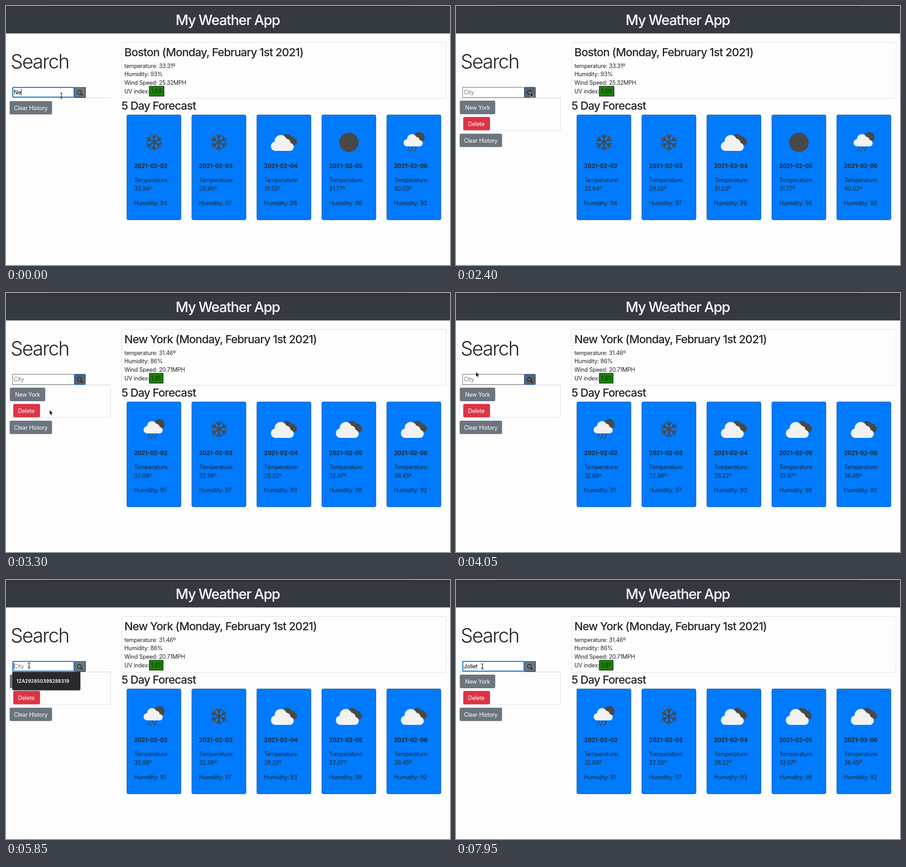
Write an HTML page that moves like this. It is 979 px wide and 572 px high and loops after 8 s.

```html
<!DOCTYPE html>
<html lang="en">
<head>
<meta charset="utf-8">
<title>My Weather App</title>
<style>
  html, body { margin: 0; width: 100%; height: 100%; overflow: hidden; background: #fdfdfd; }
  svg { display: block; width: 979px; height: 572px; }
  text {
    font: 400 12.45px Inter, "Liberation Sans", Arial, sans-serif;
    font-optical-sizing: none;
    letter-spacing: -.016em;
    fill: #212529;
    white-space: pre;
  }
  .brand { font-size: 31px; font-weight: 500; letter-spacing: -.043em; fill: #fff; }
  .head { font-size: 24.9px; font-weight: 500; letter-spacing: -.038em; }
  .search { font-size: 43px; font-weight: 300; letter-spacing: -.046em; }
  .date { font-weight: 700; letter-spacing: 0; }
  .btn { fill: #fff; }
  .hint { fill: #fff; font-size: 10.3px; font-weight: 600; letter-spacing: .01em; }
  .box { fill: none; stroke: #dfdfdf; }
  .grey { fill: #6c757d; }
  .dark { fill: #484848; }
  .pale { fill: #f2f2f0; }
  .flake, .drops { fill: none; stroke: #484848; stroke-width: 3; stroke-linecap: round; }
  .drops { stroke-width: 2.6; }
</style>
</head>
<body>
<svg viewBox="0 0 979 572">
  <defs>
    <path id="arm" d="M0 0V-17.2M-5.2-14.8L0-9.6L5.2-14.8"/>
    <g id="snow" class="flake"></g>
    <circle id="moon" class="dark" r="21.5"/>
    <g id="clouds">
      <path class="dark" d="M-3-9A10.2 10.2 0 0 1 16.5-12.5A8 8 0 0 1 25-7.5A7.5 7.5 0 0 1 24 6H0Z"/>
      <path class="pale" d="M-19.5 19A10.3 10.3 0 0 1-20.5-1.4A13.6 13.6 0 0 1 5.5-8A9.8 9.8 0 0 1 14.5 1.3A9 9 0 0 1 14 19Z"/>
    </g>
    <g id="rain">
      <circle class="dark" cx="11.8" cy="-11" r="11.7"/>
      <path class="pale" d="M-14.5 9A8 8 0 0 1-15.3-7A10.8 10.8 0 0 1 5.2-12A7.5 7.5 0 0 1 12.5-5A7 7 0 0 1 12 9Z"/>
      <path class="drops" d="M-10.5 12l-.8 1.2M-12.6 17l-.4.8M-2.8 12l-1.6 2.6M-6.2 18l-1.2 1.8M4.8 12l-.8 1.2M2.6 16l-1.6 2.8"/>
    </g>
  </defs>

  <rect width="979" height="572" fill="#fdfdfd"/>
  <rect width="979" height="60.6" fill="#343a40"/>
  <rect width="979" height="4" fill="#37383b"/>
  <rect y="4" width="979" height="1" fill="#2b2e32"/>
  <rect x="88" width="803" height="1" fill="#17181a"/>
  <text class="brand" x="374" y="42">My Weather App</text>
  <text class="search" x="10.3" y="137.6">Search</text>

  <rect class="box" x="255" y="80.5" width="715.5" height="123.5" rx="3"/>
  <g id="now"></g>
  <text x="261" y="192.7">UV index:</text>
  <rect id="uvBox" x="316" y="177.2" height="22" fill="#1a8005" stroke="#0b0b0b"/>
  <text id="uv" x="320" y="192.7"></text>
  <text class="head" x="254.5" y="229">5 Day Forecast</text>
  <g id="days"></g>

  <rect x="8" y="202.5" width="223" height="1" fill="#d4d4d4"/>
  <g id="list">
    <rect class="box" x="8.5" y="203" width="222" height="72" rx="3"/>
    <rect class="grey" x="8.5" y="209" width="78" height="30" rx="3"/>
    <text class="btn" x="20" y="228.8">New York</text>
    <rect x="16" y="245" width="59" height="29.5" rx="3" fill="#dc3545"/>
    <text class="btn" x="26.5" y="264.7">Delete</text>
  </g>
  <g id="clear">
    <rect class="grey" x="8" y="210" width="93.5" height="29.5" rx="3"/>
    <text class="btn" x="17.5" y="229.5">Clear History</text>
  </g>

  <rect id="field" fill="#fff"/>
  <text id="typed" x="17" y="195"></text>
  <rect id="caret" y="183" width="1" height="15" fill="#111"/>
  <g id="goPlain">
    <rect x="151" y="179" width="24.5" height="23.5" fill="#6c757d"/>
    <path d="M151 179.5H175" stroke="#555b61"/>
    <path d="M151 202H175V179" fill="none" stroke="#16181a"/>
  </g>
  <rect id="goFocus" x="151.5" y="179.5" width="23.5" height="22.5" rx="2" fill="#5a6168" stroke="#1a62c4" stroke-width="1.5"/>
  <g fill="none" stroke="#111">
    <circle cx="161.8" cy="190.7" r="4.4" stroke-width="1.2"/>
    <path d="M165 194L168.3 197.3" stroke-width="1.8" stroke-linecap="round"/>
  </g>
  <g id="popup">
    <rect x="13.5" y="204" width="151" height="41" rx="4" fill="#000" opacity=".16"/>
    <path d="M14 203H164V240.5A3 3 0 0 1 161 243.5H17A3 3 0 0 1 14 240.5Z" fill="#27292c"/>
    <text class="hint" x="23" y="227.3">1ZA292850398288319</text>
  </g>

  <g id="pointer">
    <path id="arrow" d="M0 0V11L2.5 8.8L4.2 12.7L6 11.9L4.4 8.1H7.7Z" fill="#000" stroke="#fff" stroke-width=".8"/>
    <g id="beam" fill="none">
      <g stroke="#fff" stroke-opacity=".75" stroke-width="2.6"><use href="#beamLine"/></g>
      <g stroke="#111" stroke-width="1.1">
        <path id="beamLine" d="M-2.8-6Q0-6 0-4.3V4.3Q0 6-2.8 6M2.8-6Q0-6 0-4.3M0 4.3Q0 6 2.8 6M-1.6 2.2H1.6"/>
      </g>
    </g>
  </g>
</svg>
<script>
const LOOP = 8000, TICK = 150;
const $ = id => document.getElementById(id);
const show = (id, on) => $(id).style.display = on ? "" : "none";
const set = (id, attrs) => { for (const k in attrs) $(id).setAttribute(k, attrs[k]); };
const text = (x, y, s, cls = "") => `<text class="${cls}" x="${x}" y="${y}">${s}</text>`;

$("snow").innerHTML = [0, 60, 120, 180, 240, 300]
  .map(a => `<use href="#arm" transform="rotate(${a})"/>`).join("");

const cities = [
  { name: "Boston", temp: 33.31, hum: 93, wind: 25.32 },
  { name: "New York", temp: 31.46, hum: 86, wind: 20.71 }
];
const forecasts = [
  { uv: "1.69", uvWidth: 32.5, icons: ["snow", "snow", "clouds", "moon", "rain"],
    temps: [33.94, 29.95, 31.53, 31.77, 40.03], hums: [94, 97, 96, 96, 93] },
  { uv: "1.91", uvWidth: 30.5, icons: ["rain", "snow", "clouds", "clouds", "clouds"],
    temps: [32.68, 32.58, 28.22, 32.07, 36.45], hums: [91, 97, 93, 98, 92] }
];

const cityView = c =>
  text(261, 111, `${c.name} (Monday, February 1st 2021)`, "head") +
  text(261, 136.5, `temperature: ${c.temp}º`) +
  text(261, 155.2, `Humidity: ${c.hum}%`) +
  text(261, 174, `Wind Speed: ${c.wind}MPH`);

const dayView = (f, i) => `<g transform="translate(${266 + i * 143.3} 0)">
  <rect x=".5" y="240.5" width="119.3" height="231.7" rx="3" fill="#007bff" stroke="#1f5794"/>
  <use href="#${f.icons[i]}" x="60.3" y="301"/>
  ${text(16.5, 358.2, `2021-02-0${i + 2}`, "date")}
  ${text(16.5, 389.4, "Temperature:")}
  ${text(16.5, 408.1, f.temps[i] + "º")}
  ${text(16.5, 439.5, "Humidity: " + f.hums[i])}
</g>`;

// [time, value]: the latest entry not after t holds
const typing = [[0, "Ne"], [150, "New"], [300, "New "], [600, "New Y"], [900, "New Yo"],
  [1050, "New York"], [2100, ""], [6300, "J"], [6450, "Jo"], [6600, "Jol"],
  [6900, "Joli"], [7050, "Jolie"], [7200, "Joliet"]];
const caretOn = [[0, true], [1650, false], [4650, true], [5250, false], [5850, true], [7650, false]];
const at = (keys, t) => keys.filter(k => k[0] <= t).pop()[1];

const path = [[0, 122, 198], [1650, 122, 198], [1950, 158, 191], [2400, 164, 190],
  [2700, 164, 190], [2850, 152, 218], [3300, 96, 258], [3750, 178, 275], [3900, 112, 224],
  [4050, 44, 174], [4200, 19, 186], [4350, 51, 189], [7800, 51, 189], [7950, 58, 191], [LOOP, 58, 191]];

function pointerAt(t) {
  const i = path.findIndex(p => p[0] > t);
  const [a, b] = [path[i - 1], path[i]];
  const k = (t - a[0]) / (b[0] - a[0]);
  return [a[1] + (b[1] - a[1]) * k, a[2] + (b[2] - a[2]) * k];
}

let cityShown, forecastShown;
function showCity(n) {
  if (n === cityShown) return;
  cityShown = n;
  $("now").innerHTML = cityView(cities[n]);
}
function showForecast(n) {
  if (n === forecastShown) return;
  forecastShown = n;
  const f = forecasts[n];
  $("days").innerHTML = f.icons.map((_, i) => dayView(f, i)).join("");
  $("uv").textContent = f.uv;
  set("uvBox", { width: f.uvWidth });
}

function render(t) {
  const listed = t >= 2100;
  const focused = !listed || t >= 4650;
  showCity(t >= 2850 ? 1 : 0);
  showForecast(t >= 3000 ? 1 : 0);

  show("list", listed);
  set("clear", { transform: `translate(0 ${listed ? 72 : 0})` });
  show("popup", t >= 4800 && t < 6300);
  show("goPlain", focused);
  show("goFocus", !focused);
  set("field", focused
    ? { x: 15, y: 179.7, width: 135, height: 21.5, rx: 1.5, stroke: "#1565c9", "stroke-width": 2 }
    : { x: 14.5, y: 179.5, width: 136, height: 22.5, rx: 0, stroke: "#5c5f63", "stroke-width": 1 });

  const value = at(typing, t);
  $("typed").textContent = value || "City";
  $("typed").style.fill = value ? "#000" : "#757575";
  const end = value ? $("typed").getComputedTextLength() : 0;
  set("caret", { x: Math.round(17 + end) });
  show("caret", focused && at(caretOn, t));

  const beam = t < 1950 || t >= 4200;
  show("beam", beam);
  show("arrow", !beam);
  set("pointer", { transform: `translate(${pointerAt(t)})` });
}

const start = performance.now();
function frame() {
  const t = (performance.now() - start) % LOOP;
  render(Math.floor(t / TICK) * TICK);
  requestAnimationFrame(frame);
}
frame();
</script>
</body>
</html>
```
